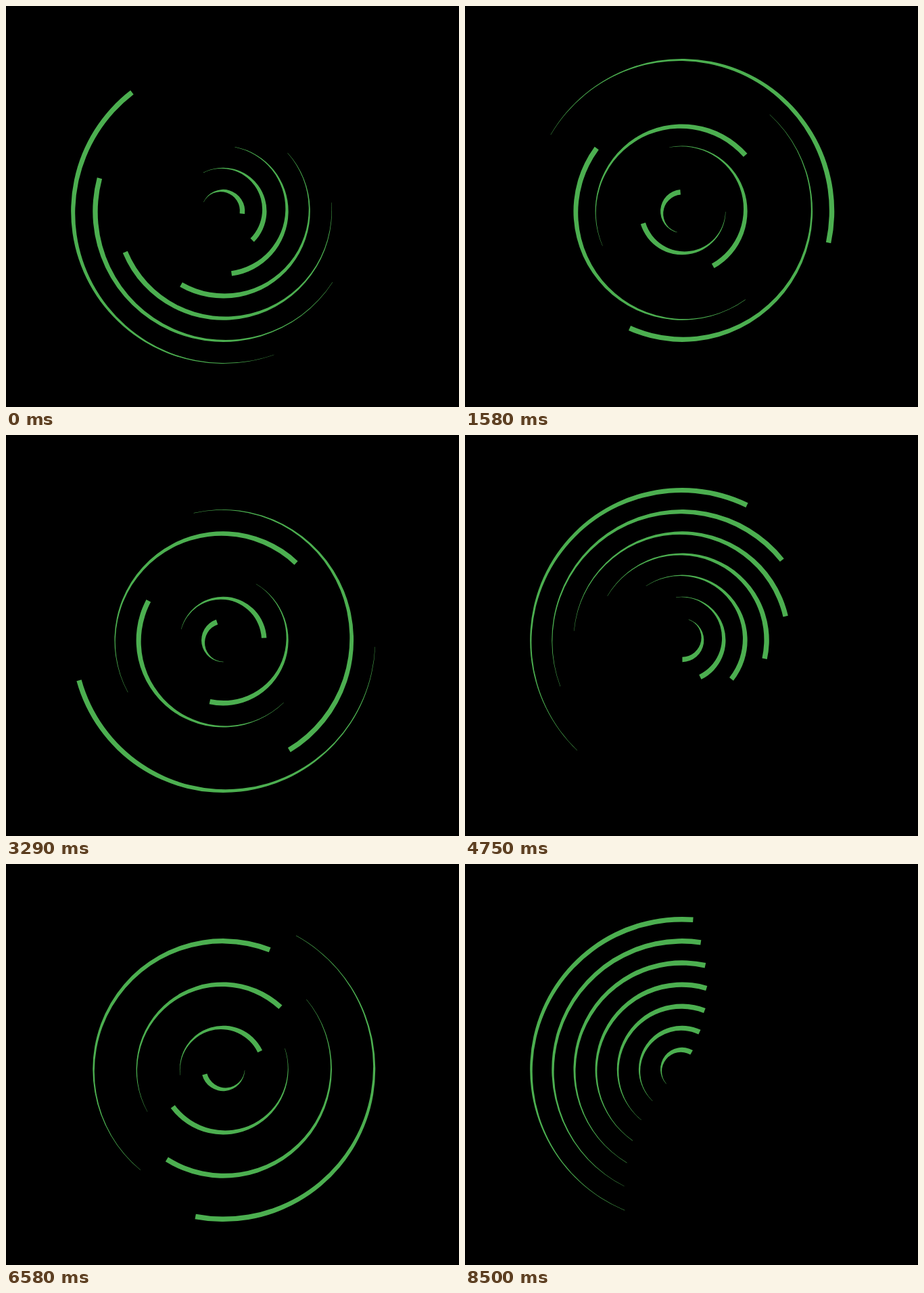
An HTML page that plays this animation: 670 px wide and 592 px high, repeating every 8540 ms.

```html
<!DOCTYPE html>
<html lang="en">
<head>
<meta charset="utf-8">
<title>Spinning crescents</title>
<style>
  html, body { margin: 0; width: 100%; height: 100%; overflow: hidden; background: #000; }
  svg { display: block; width: 100%; height: 100%; }
</style>
</head>
<body>
<svg viewBox="0 0 670 592">
  <g id="rings" transform="translate(321.2 303)" fill="#4caf50"></g>
</svg>
<script>
const LOOP = 8540, STEPS = 181;         // the picture advances in even steps
const LEAD = 10;                        // ms by which each step comes early
const CLOCK_START = 3.583, CLOCK_STEP = 0.04702; // seconds since all heads pointed up
const RINGS = 7, GAP = 32.15;
const HEAD = 7.5, TAIL = 0.2;           // thickness at both ends of a half turn
const SWEEP = 162 * Math.PI / 180;

// Tapering arc: blunt head at the top, running counterclockwise to a thin tail
function crescent(r) {
  const sin = Math.sin(SWEEP), cos = Math.cos(SWEEP);
  const end = TAIL + (HEAD - TAIL) * (1 + cos) / 2;
  const inner = r - (HEAD + TAIL) / 2;
  const at = d => `${(-d * sin).toFixed(2)} ${(-d * cos).toFixed(2)}`;
  return `M0 ${-r}A${r} ${r} 0 0 0 ${at(r)}L${at(r - end)}` +
    `A${inner} ${inner} 0 0 1 0 ${HEAD - r}Z`;
}

const group = document.getElementById("rings");
const rings = Array.from({ length: RINGS }, (_, i) => {
  const path = document.createElementNS("http://www.w3.org/2000/svg", "path");
  path.setAttribute("d", crescent(GAP * (i + 1)));
  return group.appendChild(path);
});

function draw(ms) {
  const step = Math.min(STEPS - 1, Math.floor((ms + LEAD) * STEPS / LOOP));
  const seconds = CLOCK_START + step * CLOCK_STEP;
  // The outermost ring makes a quarter turn per second, each inner one a quarter more
  rings.forEach((ring, i) => {
    const angle = 90 * (RINGS - i) * seconds % 360;
    ring.setAttribute("transform", `rotate(${angle.toFixed(2)})`);
  });
}

const start = performance.now();
function tick() {
  draw((performance.now() - start) % LOOP);
  requestAnimationFrame(tick);
}
tick();
</script>
</body>
</html>
```
